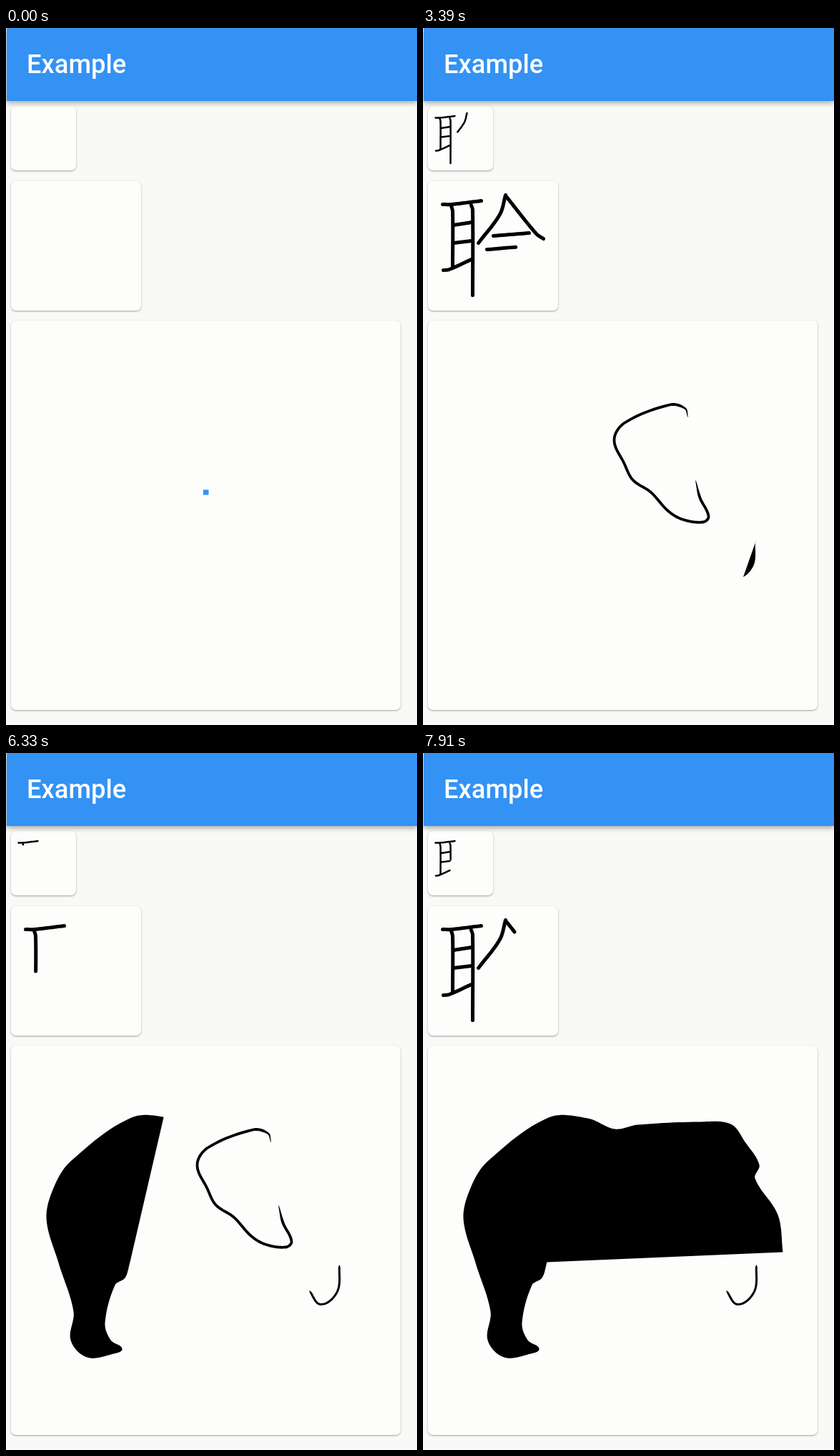
An HTML page with a canvas that plays this animation: 575 by 974 pixels, repeating every 8 s.

```html
<!DOCTYPE html>
<html lang="en">
<head>
<meta charset="utf-8">
<title>Example</title>
<style>
  html, body { margin: 0; width: 100%; height: 100%; overflow: hidden; background: #f9f9f8; }
  header {
    position: absolute; left: 1px; right: 0; top: 0; height: 102px; z-index: 1;
    background: #3392f4; box-shadow: 0 3px 7px rgba(0, 0, 0, .32);
  }
  h1 {
    position: absolute; left: 28px; top: 30px; margin: 0;
    font: 500 36.3px/42px Roboto, sans-serif; color: #fff;
  }
  .card {
    position: absolute; left: 7px; background: #fdfdfc; border-radius: 7px;
    box-shadow: 0 1px 2px rgba(0, 0, 0, .3), 0 1px 4px rgba(0, 0, 0, .08);
  }
  canvas { position: absolute; left: 0; top: 0; }
</style>
</head>
<body>
<header><h1>Example</h1></header>
<div class="card" style="top:109px;width:91px;height:90px"></div>
<div class="card" style="top:214px;width:182px;height:181px"></div>
<div class="card" style="top:409px;width:545px;height:544px"></div>
<canvas width="575" height="974"></canvas>
<script>
const ctx = document.querySelector('canvas').getContext('2d');
const STEPS = 12; // samples per curve segment

// Smooth curve through key points "x,y x,y ..."; tangents follow the neighbours
function curve(text) {
  const p = text.split(' ').map(s => s.split(',').map(Number));
  const out = [p[0]];
  for (let i = 0; i < p.length - 1; i++) {
    const a = p[i - 1] || p[i], b = p[i], c = p[i + 1], d = p[i + 2] || c;
    const span = Math.hypot(c[0] - b[0], c[1] - b[1]);
    const m = span / Math.hypot(c[0] - a[0], c[1] - a[1]);
    const n = span / Math.hypot(d[0] - b[0], d[1] - b[1]);
    for (let j = 1; j <= STEPS; j++) {
      const t = j / STEPS, r = 1 - t;
      out.push([0, 1].map(k => b[k] * r * r * (1 + 2 * t) + c[k] * t * t * (1 + 2 * r)
        + t * r * (r * m * (c[k] - a[k]) - t * n * (d[k] - b[k]))));
    }
  }
  return measure(out);
}

// Adds running lengths to a list of points
function measure(pts) {
  const cum = [0];
  for (let i = 1; i < pts.length; i++)
    cum.push(cum[i - 1] + Math.hypot(pts[i][0] - pts[i - 1][0], pts[i][1] - pts[i - 1][1]));
  return { pts, cum, total: cum[cum.length - 1] };
}

// Thin closed contour around a centre line, tapered at both ends
function contour({ pts, cum, total }, width, taper) {
  const side = sign => pts.map(([x, y], i) => {
    const a = pts[Math.max(0, i - 1)], b = pts[Math.min(pts.length - 1, i + 1)];
    const dx = b[0] - a[0], dy = b[1] - a[1];
    const w = width / 2 * Math.min(1, .2 + Math.min(cum[i], total - cum[i]) / taper);
    const k = sign * w / Math.hypot(dx, dy);
    return [x - dy * k, y + dx * k];
  });
  return measure([...side(1), ...side(-1).reverse()]);
}

// Builds the path of the first `len` pixels of a line
function trace({ pts, cum }, len) {
  ctx.beginPath();
  ctx.moveTo(...pts[0]);
  for (let i = 1; i < pts.length; i++) {
    if (cum[i] <= len) { ctx.lineTo(...pts[i]); continue; }
    const f = (len - cum[i - 1]) / (cum[i] - cum[i - 1]);
    ctx.lineTo(...[0, 1].map(k => pts[i - 1][k] + f * (pts[i][k] - pts[i - 1][k])));
    break;
  }
}

const strokes = [
  '27,246 39,246 81,241',
  '39,248 41,256 41,333',
  '42,275 68,271',
  '42,300 67,297',
  '28,338 36,337 67,323',
  '67,247 69,254 69,373',
  '115,233 107,260 77,300',
  '116,235 158,287 168,294',
  '98,290 148,286',
  '89,309 152,305 157,310 145,348 133,349',
  '112,311 116,318 116,380'
].map(curve);
const inkTotal = strokes.reduce((sum, s) => sum + s.total, 0);

const ear = curve('381,632 387,656 399,682 391,690 362,686 342,674 318,648 293,631 281,608 ' +
  '267,575 282,551 345,526 366,531 370,543');
const tail = curve('466,715 463,752 440,770 424,751');
const body = curve('173,711 166,733 152,743 138,796 146,820 162,832 150,839 113,844 90,820 94,780 ' +
  '73,712 56,650 67,605 90,570 175,509 230,510 268,525 300,519 385,515 430,518 450,543 470,575 ' +
  '464,594 496,645 503,697');

// Each drawn at constant speed between two ticks
const shapes = [
  { line: contour(ear, 3.8, 26), from: 6, to: 66 },
  { line: contour(tail, 3, 4), from: 66, to: 79 },
  { line: body, from: 79, to: 168 }
];

// Uneven playback: three ticks every 140 ms, held 100, 20 and 20 ms
function tickAt(t) {
  if (t < 70) return -1;
  const r = (t - 70) % 140;
  return 3 * Math.floor((t - 70) / 140) + (r < 100 ? 0 : r < 120 ? 1 : 2);
}

// cubic-bezier(.4, 0, .2, 1)
function fastOutSlowIn(x) {
  let lo = 0, hi = 1, s;
  for (let i = 0; i < 24; i++) {
    s = (lo + hi) / 2;
    const bx = 1.2 * s * (1 - s) ** 2 + .6 * s * s * (1 - s) + s ** 3;
    if (bx < x) lo = s; else hi = s;
  }
  return s * s * (3 - 2 * s);
}

function drawInk(part) {
  let left = part * inkTotal;
  ctx.lineWidth = 5;
  ctx.lineCap = ctx.lineJoin = 'round';
  for (const s of strokes) {
    if (left <= 0) break;
    trace(s, left);
    ctx.stroke();
    left -= s.total;
  }
}

function drawSpinner(n) {
  const u = Math.max(0, n - 5.4) / 72;
  const start = Math.PI * (1.7 * u - .5);
  const sweep = Math.max(.01, 1.5 * Math.PI * fastOutSlowIn(2 * u));
  ctx.strokeStyle = '#3392f8';
  ctx.lineWidth = 7.3;
  ctx.lineCap = 'square';
  ctx.beginPath();
  ctx.arc(279, 681, 32.7, start, start + sweep);
  ctx.stroke();
}

function draw(n) {
  ctx.setTransform(1, 0, 0, 1, 0, 0);
  ctx.clearRect(0, 0, 575, 974);
  ctx.translate(.5, .5);
  ctx.strokeStyle = ctx.fillStyle = '#000';

  const x = n < 6 ? 0 : (n - 3.9) / 120 % 1;
  drawInk(1 - (1 - x) ** 2);
  ctx.save();
  ctx.translate(3.5, 2);
  ctx.scale(.5, .5);
  drawInk(x);
  ctx.restore();

  if (n < 32) return drawSpinner(n);
  for (const { line, from, to } of shapes) {
    if (n <= from) break;
    trace(line, line.total * (n - from) / (to - from));
    ctx.fill();
  }
}

function loop() {
  draw(tickAt(performance.now() % 8000));
  requestAnimationFrame(loop);
}
loop();
</script>
</body>
</html>
```
